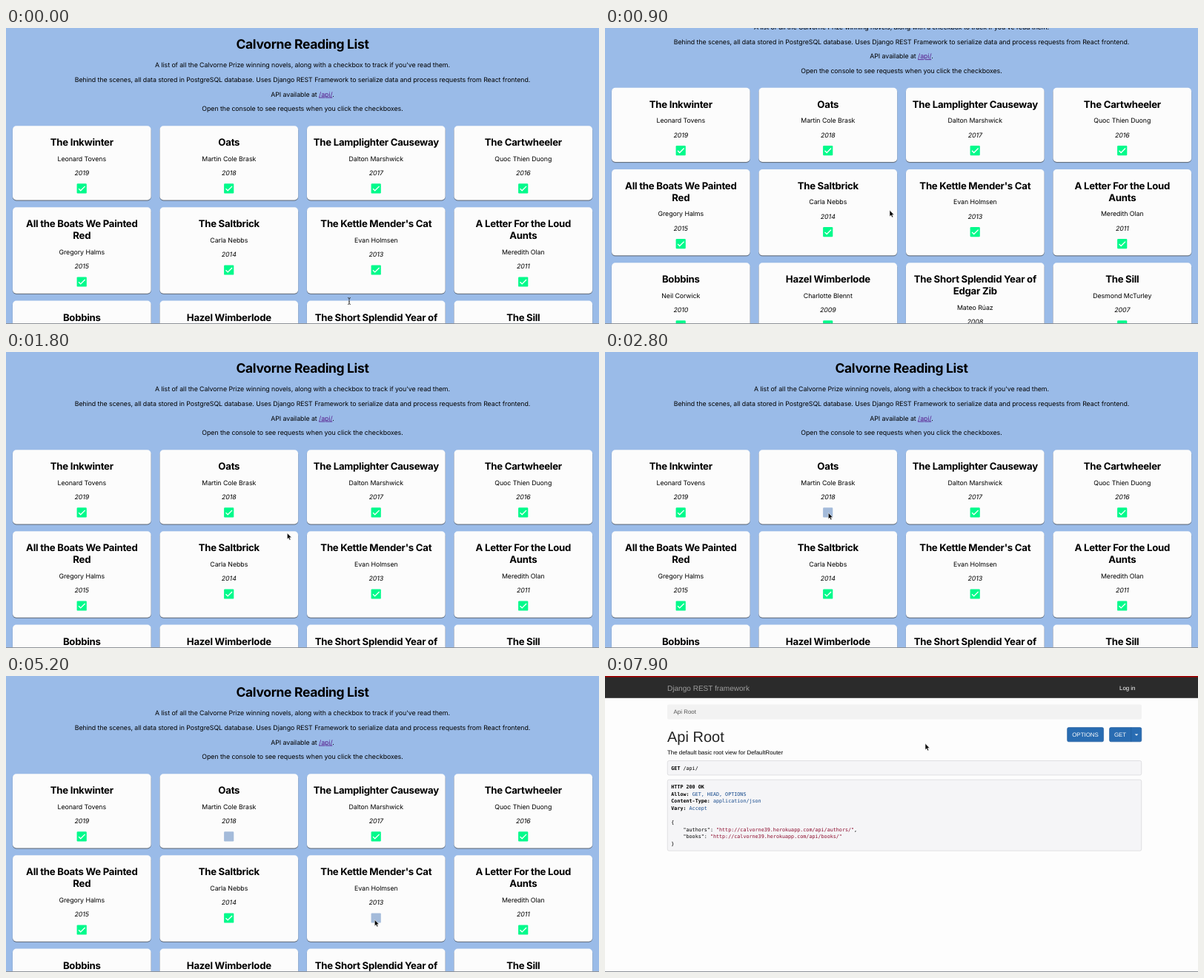
Animation, 800 px wide and 400 px high, one loop 8000 ms. Source, as an HTML page:

```html
<!DOCTYPE html>
<html lang="en">
<head>
<meta charset="utf-8">
<title>Reading list</title>
<style>
  html, body { margin: 0; width: 100%; height: 100%; overflow: hidden; background: #9abbe8; }
  svg { display: block; width: 800px; height: 400px; }
  text { text-rendering: geometricPrecision; white-space: pre; }
  #list text { font: 8.8px Inter, sans-serif; letter-spacing: -.058px; text-anchor: middle; }
  #list .h1 { font-size: 17.5px; font-weight: 700; letter-spacing: -.02em; }
  #list .h2 { font-size: 13.2px; font-weight: 700; letter-spacing: -.02em; }
  #list .year { font-style: italic; }
  .shadow { fill: #6c7683; stroke: #46505f; stroke-opacity: .2; }
  .link { fill: #551a8b; text-decoration: underline; }
  #api text { font: 7.9px "Liberation Sans", Arial, sans-serif; }
  #api .brand { font-size: 10.05px; fill: #9d9d9d; }
  #api .head { font-size: 20px; fill: #222; }
  #api .code { font: 6.72px "DejaVu Sans Mono", monospace; }
  .code .key { font-weight: 700; }
  .code .val { fill: #14498c; }
  .code .str { fill: #8c0a2c; }
  .panel { fill: #f5f5f7; stroke: #cfcfd2; stroke-width: .6; }
  .btn { fill: #296cb2; stroke: #225c9b; stroke-width: .6; }
  #api .white { fill: #fff; }
</style>
</head>
<body>
<svg viewBox="0 0 800 400">
  <g id="list"></g>
  <g id="api"></g>
  <rect y="399" width="800" height="1" fill="#8e9298"/>
  <path id="beam" d="M-2 -4.5Q0 -4.5 0 -3Q0 -4.5 2 -4.5M0 -3V3M-2 4.5Q0 4.5 0 3Q0 4.5 2 4.5M-1 1H1"
    fill="none" stroke="#222" stroke-width=".8"/>
  <path id="arrow" d="M0 0V8.4L1.9 6.7L3.2 9.6L4.7 8.9L3.4 6.1H6Z"
    fill="#000" stroke="#fff" stroke-width=".6"/>
</svg>
<script>
const $ = id => document.getElementById(id);
const text = (x, y, s, cls = '') => `<text x="${x}" y="${y}" class="${cls}">${s}</text>`;
const rect = (x, y, w, h, attrs) => `<rect x="${x}" y="${y}" width="${w}" height="${h}" ${attrs}/>`;
const span = (cls, s) => `<tspan class="${cls}">${s}</tspan>`;

// title ("|" breaks the line), author, year
const books = [
  ['The Inkwinter', 'Leonard Tovens', 2019],
  ['Oats', 'Martin Cole Brask', 2018],
  ['The Lamplighter Causeway', 'Dalton Marshwick', 2017],
  ['The Cartwheeler', 'Quoc Thien Duong', 2016],
  ['All the Boats We Painted|Red', 'Gregory Halms', 2015],
  ['The Saltbrick', 'Carla Nebbs', 2014],
  ["The Kettle Mender's Cat", 'Evan Holmsen', 2013],
  ['A Letter For the Loud|Aunts', 'Meredith Olan', 2011],
  ['Bobbins', 'Neil Corwick', 2010],
  ['Hazel Wimberlode', 'Charlotte Blennt', 2009],
  ['The Short Splendid Year of|Edgar Zib', 'Mateo Rúaz', 2008],
  ['The Sill', 'Desmond McTurley', 2007]
];
const rows = [[132.2, 100.2], [242.3, 116.4], [368.6, 116.4]];

function card([title, author, year], i) {
  const x = 9 + 198.5 * (i % 4), cx = x + 93.3, [y, h] = rows[i >> 2];
  const lines = title.split('|'), drop = 16 * (lines.length - 1);
  return rect(x, y + 1, 186.6, h, 'rx="5" class="shadow"') +
    rect(x, y, 186.6, h, 'rx="5" fill="#fcfcfc"') +
    lines.map((s, n) => text(cx, y + 26.9 + 16 * n, s, 'h2')).join('') +
    text(cx, y + 47.4 + drop, author) +
    text(cx, y + 67.1 + drop, year, 'year') +
    `<g transform="translate(${cx - .1} ${y + 84.7 + drop})">` +
    rect(-6.6, -6.6, 13.2, 13.2, `rx="1.2" id="box${i}"`) +
    `<path id="tick${i}" d="M-4.2 .2L-1.5 2.9L4.4 -3" fill="none" stroke="#fff" stroke-width="1.3"/></g>`;
}

$('list').innerHTML =
  text(400, 28.3, 'Calvorne Reading List', 'h1') +
  [
    "A list of all the Calvorne Prize winning novels, along with a checkbox to track if you've read them.",
    'Behind the scenes, all data stored in PostgreSQL database. Uses Django REST Framework to serialize data and process requests from React frontend.',
    `API available at ${span('link', '/api/')}.`,
    'Open the console to see requests when you click the checkboxes.'
  ].map((s, i) => text(400, 53.2 + 19.7 * i, s)).join('') +
  books.map(card).join('');

const field = (key, val) => span('key', key + ':') + ' ' + span('val', val);
const entry = (name, end) =>
  `    "${name}": ${span('str', `"http://calvorne39.herokuapp.com/api/${name}/"`)}${end}`;

$('api').innerHTML =
  rect(0, 0, 800, 400, 'fill="#fdfdfd"') +
  rect(0, 0, 800, 29.8, 'fill="#2b2b2b"') +
  rect(0, 0, 800, 1.6, 'fill="#a30000"') +
  text(84, 19.6, 'Django REST framework', 'brand') +
  text(694, 19, 'Log in', 'white') +
  rect(84, 38.4, 640, 20.2, 'rx="2" fill="#f2f2f2"') +
  `<g fill="#555">${text(92.6, 51.4, 'Api Root')}</g>` +
  text(84, 89, 'Api Root', 'head') +
  text(84, 106, 'The default basic root view for DefaultRouter') +
  rect(623.6, 69.6, 49, 19.2, 'rx="2" class="btn"') +
  rect(680.5, 69.6, 43.3, 19.2, 'rx="2" class="btn"') +
  '<path d="M709.7 69.6V88.8" stroke="#225c9b" stroke-width=".7"/>' +
  '<path d="M714.7 78.4H719.3L717 80.8Z" fill="#fff"/>' +
  `<g text-anchor="middle">${text(648, 82.2, 'OPTIONS', 'white')}${text(695, 82.2, 'GET', 'white')}</g>` +
  rect(84.3, 114.5, 639.4, 19.4, 'rx="2" class="panel"') +
  text(89.3, 127, span('key', 'GET') + ' /api/', 'code') +
  rect(84.3, 140.2, 639.4, 96, 'rx="2" class="panel"') +
  [
    span('key', 'HTTP 200 OK'),
    field('Allow', 'GET, HEAD, OPTIONS'),
    field('Content-Type', 'application/json'),
    field('Vary', 'Accept'),
    '', '{', entry('authors', ','), entry('books', ''), '}'
  ].map((s, i) => text(89.3, 152 + 9.64 * i, s, 'code')).join('');

// keys: [time, ...values], eased between neighbours
function track(keys, t) {
  const n = keys.findIndex(k => k[0] > t);
  if (n < 1) return keys[n < 0 ? keys.length - 1 : 0].slice(1);
  const a = keys[n - 1], b = keys[n], p = (t - a[0]) / (b[0] - a[0]);
  const e = p * p * (3 - 2 * p);
  return a.slice(1).map((v, i) => v + (b[i + 1] - v) * e);
}

const pointer = [
  [0, 463, 369], [100, 463, 369], [400, 384, 246.3], [1700, 384, 246.3], [2400, 301.3, 217.3],
  [3200, 301.3, 217.3], [4200, 497.3, 329.5], [5400, 497.3, 329.5], [6500, 430, 94.8],
  [6800, 430, 94.8], [7100, 432, 91.3], [8000, 432, 91.3]
];
const scroll = [[200, 0], [600, 69.6], [750, 84], [1100, 1.9], [1800, 0]];
const clicks = { 1: 2500, 6: 4500 };

function draw(now) {
  const t = now % 8000, at = `translate(${track(pointer, t)})`;
  $('list').setAttribute('transform', `translate(0 ${-track(scroll, t)[0]})`);
  books.forEach((_, i) => {
    const on = !(t >= clicks[i]);
    $('box' + i).setAttribute('fill', on ? '#00fa8b' : '#a4bbda');
    $('tick' + i).style.display = on ? '' : 'none';
  });
  $('api').style.display = t >= 7400 ? '' : 'none';
  $('beam').style.display = t < 100 ? '' : 'none';
  $('arrow').style.display = t < 100 ? 'none' : '';
  $('beam').setAttribute('transform', at);
  $('arrow').setAttribute('transform', at);
}

const start = performance.now();
function loop() {
  draw(performance.now() - start);
  requestAnimationFrame(loop);
}
loop();
</script>
</body>
</html>
```
